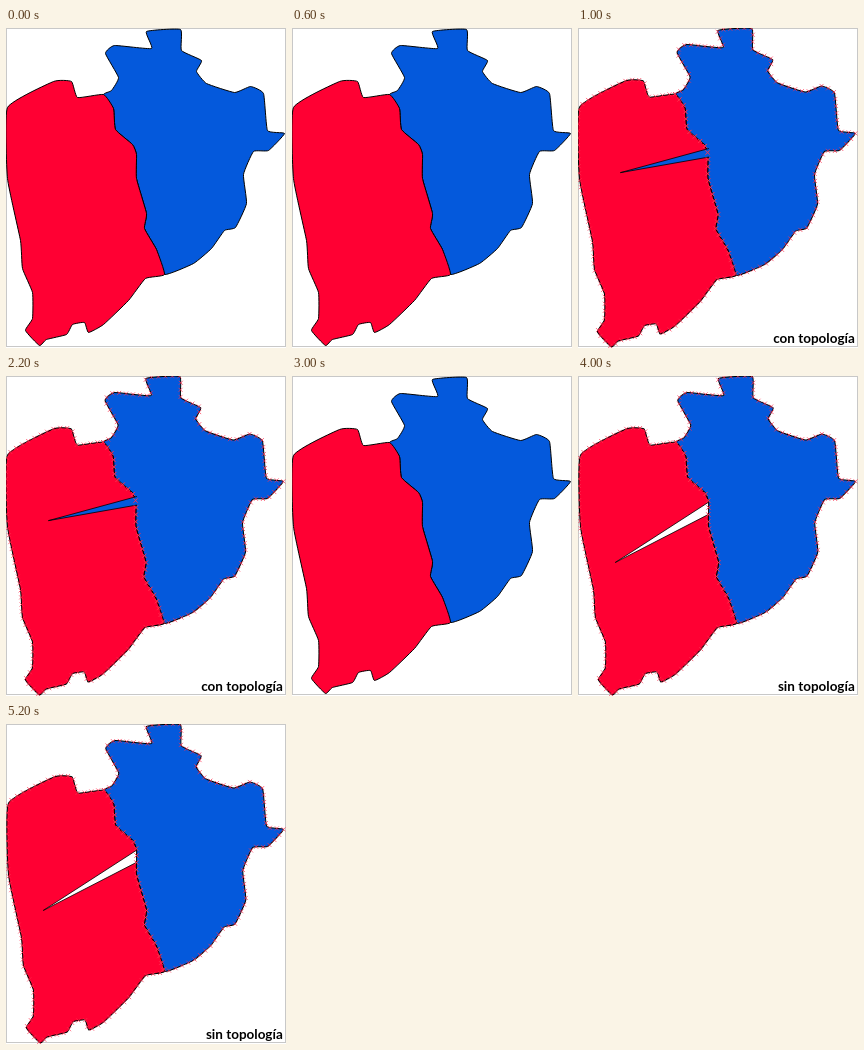
An HTML page that plays this animation: 280x320 px, repeating every 6000 ms.

```html
<!DOCTYPE html>
<html lang="es">
<head>
<meta charset="utf-8">
<style>
html, body { margin: 0; width: 100%; height: 100%; overflow: hidden; background: #fff; }
svg { display: block; width: 100vw; height: 100vh; }
text { font: bold 13.5px Lato, "Open Sans", sans-serif; text-anchor: end; }
.frame { fill: none; stroke: #c8c8c8; }
#map { stroke: #000; stroke-linejoin: round; }
#east { fill: #0459dc; }
#west { fill: #ff0033; }
#gap { stroke-width: .8; }
#nodes { fill: none; stroke: #ff3050; stroke-width: .7; }
</style>
</head>
<body>
<svg viewBox="0 0 280 320">
  <rect class="frame" x=".5" y=".5" width="279" height="318"/>
  <g id="map">
    <path id="east"/>
    <path id="west"/>
    <polyline id="gap"/>
    <path id="nodes"/>
  </g>
  <text id="label" x="276.8" y="314.5"></text>
</svg>
<script>
const $ = id => document.getElementById(id);
const points = s => s.split(' ').map(p => p.split(',').map(Number));

// Key points: the shared border runs south, each coast runs from its south end to its north end
const border = points('97,66 107,80 109,101 126,116 130,126 130,150 140,185 138,200 150,221 158,246');
const westCoast = points('139,250 122,272 97,296 82,304 78,294 66,296 60,306 40,311 33,317 19,302 26,290 26,264 16,240 14,212 1,150 1,79 47,53 65,53 71,69');
const eastCoast = points('187,235 205,220 218,202 229,199 240,175 237,146 247,123 262,122 278,105 261,102 257,65 244,58 228,64 200,55 190,43 195,32 175,22 174,1 140,3 145,20 108,17 99,25 112,49 105,62');

// Closed outline, bent slightly at its key points
function outline(pts, bend = .07) {
  const at = i => pts[(i + pts.length) % pts.length];
  const handle = (i, dir) => at(i).map((v, k) => v + dir * bend * (at(i + 1)[k] - at(i - 1)[k]));
  return `M${pts[0]}` + pts.map((_, i) => `C${handle(i, 1)} ${handle(i + 1, -1)} ${at(i + 1)}`).join('') + 'Z';
}

// Crosses at even steps along a path
function crosses(path, step = 7, arm = 2) {
  let d = '';
  for (let s = 0; s < path.getTotalLength(); s += step) {
    const { x, y } = path.getPointAtLength(s);
    d += `M${x - arm} ${y - arm}l${2 * arm} ${2 * arm}m0 ${-2 * arm}l${-2 * arm} ${2 * arm}`;
  }
  return d;
}

const plain = { text: '', gap: '', fill: 'none', fit: 'translate(.5 .5)' };
const joined = { text: 'con topología', gap: '131,120 42,144 131,128.5',
  fill: '#0459dc', fit: 'matrix(.996 0 0 1.008 .5 -.5)' };
const loose = { text: 'sin topología', gap: '129.5,126 36,185.5 129.5,138',
  fill: '#fff', fit: 'matrix(.993 0 0 1.008 1.5 -.5)' };

$('west').setAttribute('d', outline([...border, ...westCoast]));
$('east').setAttribute('d', outline([...border, ...eastCoast]));
$('nodes').setAttribute('d', crosses($('west')) + crosses($('east')));

// Each half of the loop: 1 s plain, then 2 s with the edited border
function draw() {
  const t = (performance.now() - start) % 6000;
  const view = t % 3000 < 1000 ? plain : t < 3000 ? joined : loose;
  $('map').setAttribute('transform', view.fit);
  $('gap').setAttribute('points', view.gap);
  $('gap').setAttribute('fill', view.fill);
  $('nodes').style.display = view === plain ? 'none' : '';
  $('label').textContent = view.text;
  requestAnimationFrame(draw);
}

const start = performance.now();
draw();
</script>
</body>
</html>
```
